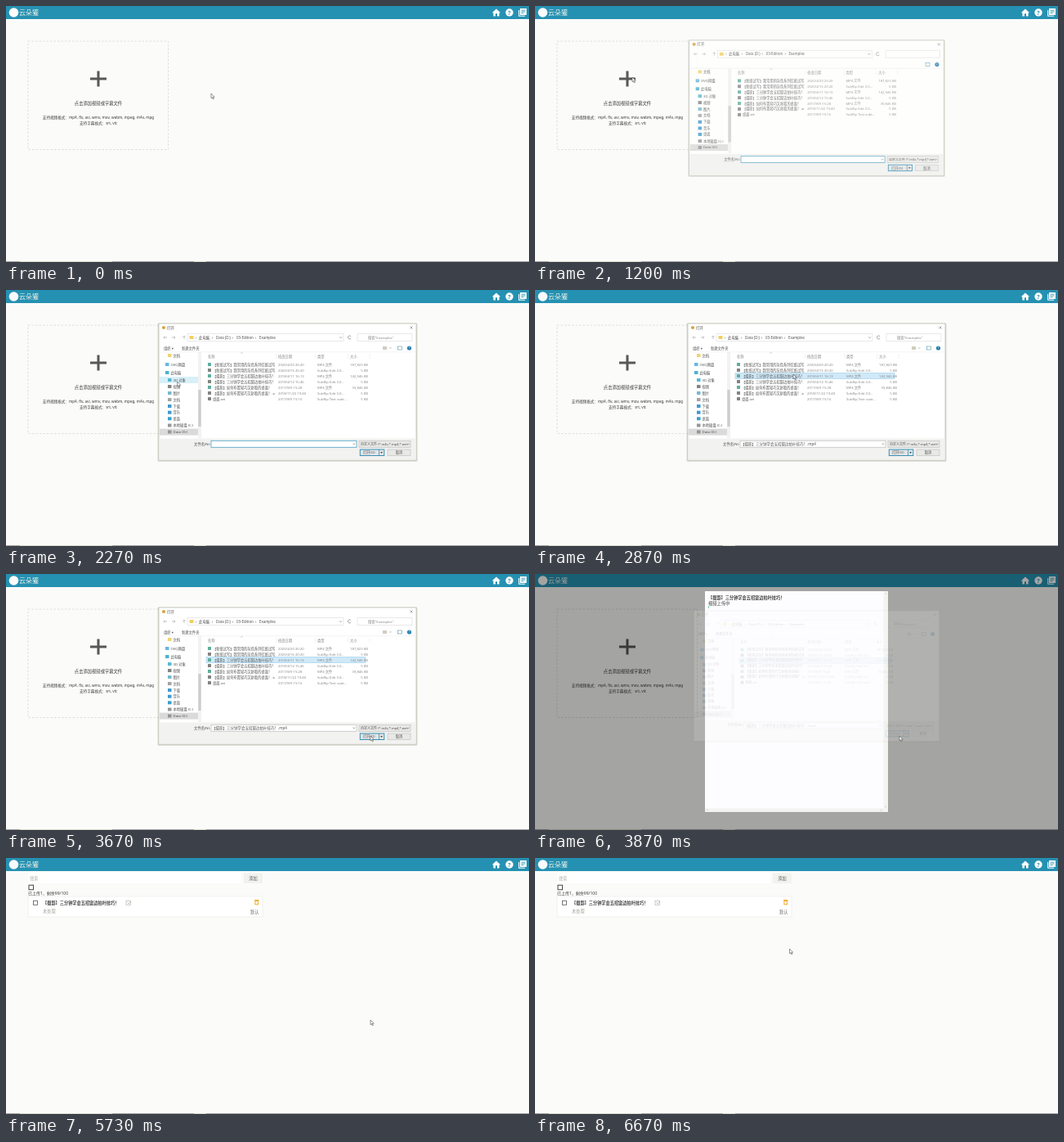
An HTML page for the animation above (6740 ms loop, 640x313 px).

```html
<!DOCTYPE html>
<html lang="zh">
<head>
<meta charset="utf-8">
<style>
html, body { margin: 0; width: 100%; height: 100%; overflow: hidden; background: #fbfbf9; }
svg { display: block; width: 640px; height: 313px; }
text { font-family: "Noto Sans", "Noto Sans CJK SC", sans-serif; white-space: pre; }
</style>
</head>
<body>
<svg id="stage" viewBox="0 0 640 313"></svg>
<script>
const LOOP = 6740;
const TITLE = '【摄影】三分钟学会五招窗边拍叶技巧！';
const PAGE = '#fbfbf9', BLUE = '#2591b2', INK = '#3c3c3c', TEXT = '#505050', FAINT = '#888', EDGE = '#c4c4c4';

// y is the vertical middle of the line
const text = (x, y, str, size = 4.6, fill = TEXT, more = '') =>
  `<text x="${x}" y="${y + size * .36}" font-size="${size}" fill="${fill}" ${more}>${str}</text>`;
const rect = (x, y, w, h, fill, more = '') =>
  `<rect x="${x}" y="${y}" width="${w}" height="${h}" fill="${fill}" ${more}/>`;
const box = (x, y, w, h, stroke, fill = 'none', width = .7) =>
  rect(x, y, w, h, fill, `stroke="${stroke}" stroke-width="${width}"`);
const line = (d, stroke, width = .8) =>
  `<path d="${d}" fill="none" stroke="${stroke}" stroke-width="${width}"/>`;
const dot = (x, y, r, fill) => `<circle cx="${x}" cy="${y}" r="${r}" fill="${fill}"/>`;
const group = (id, body) => `<g id="${id}">${body}</g>`;
const mid = 'text-anchor="middle"', end = 'text-anchor="end"', bold = 'font-weight="600"';

const header = rect(0, 0, 640, 16, BLUE) + dot(9.5, 8, 5.8, '#fbfbfb') +
  text(16, 8, '云朵獾', 8, '#f0f0e8') +
  '<path d="M600 3.5l5.2 4.7h-1.6v4.2h-2.6v-3.2h-2v3.2h-2.6v-4.2h-1.6z" fill="#fff"/>' +
  dot(616, 8, 4.7, '#fff') + text(616, 8, '?', 7, BLUE, mid + ' font-weight="700"') +
  line('M627.7 5v7.3h7.3', '#fff', 1.1) + rect(629, 3, 8, 8, '#fff') +
  line('M630.5 5.2h5M630.5 7h5M630.5 8.8h3', BLUE, .8);

const footer = rect(0, 312, 640, 1, '#a4a4a4') + rect(17, 312, 113, 1, '#dcdcd4') +
  rect(230, 312, 15, 1, '#dcdcd4');

const dropZone =
  rect(27, 43, 171.5, 132.5, 'none', 'stroke="#d8d8d0" stroke-width=".8" stroke-dasharray="2.5 2"') +
  line('M103 89h20M113 79.5v19', '#585858', 3) +
  text(113, 119, '点击添加视频或字幕文件', 5.3, INK, mid) +
  text(113, 136.5, '支持视频格式：mp4, flv, avi, wmv, mov, webm, mpeg, m4v, mpg', 4.6, INK, mid) +
  text(113, 143, '支持字幕格式：srt, vtt', 4.6, INK, mid);

const list =
  rect(27, 18, 261, 13, '#fff') + text(29, 25, '搜索', 5.2, '#b0b0a8') +
  rect(291, 18.5, 23, 12.5, '#f2f2ee') + text(302.5, 25, '添加', 5.2, '#606060', mid) +
  box(28, 33.2, 5.5, 5.5, '#484848', '#fff', 1) +
  text(27, 43.5, '已上传1，剩余99/100', 5, INK) +
  box(27, 47, 287, 25, '#ebebe8', '#fff') +
  box(33.5, 52.3, 5, 5, '#686868', 'none', .9) +
  text(45, 54.7, TITLE, 5.2, INK, bold) +
  box(147, 52.3, 5.5, 5, '#b4b4ac') + line('M148.5 54.5l1.5 1.5l3-3', '#b4b4ac') +
  text(45, 64.7, '未处理', 5.2, '#a0a098') + text(299, 66, '默认', 5.2, '#707070') +
  rect(304, 51, 5.4, 1, '#f2ab2c') + box(304.9, 52.6, 3.6, 4.2, '#f2ab2c', 'none', 1);

const places = [['文档', 80, '#f0d470'], ['OVQ网盘', 91, '#69b6e2'], ['此电脑', 101, '#4fb0d0'],
  ['3D 对象', 110, '#58b9d6'], ['视频', 118, '#848484'], ['图片', 126, '#77b9d0'],
  ['文档', 134, '#a4a4a4'], ['下载', 142, '#3f9ad0'], ['音乐', 149.7, '#3f9ad0'],
  ['桌面', 157.3, '#38a0cc'], ['本地磁盘 (C:)', 165.5, '#969696'], ['Data (D:)', 173.5, '#969696']];
const sidebar = rect(188, 169.6, 47, 8, '#dadada') +
  group('hover', rect(188, 106, 47, 8, '#d9f0f8')) +
  places.map(([name, y, color], i) => {
    const x = i && i < 3 ? 195 : 198;
    return rect(x, y - 2, 4.5, 4, color) + text(x + 6.5, y, name, 4.3);
  }).join('') +
  rect(235, 76, 4, 105, '#f2f2f2') + rect(235.3, 122, 3.4, 45, '#cdcdcd');

const ink = '【新纸试写】我常用的灰色系列信纸试写分…';
const files = [
  [ink, '2020/4/20 20:20', 'MP4 文件', '187,823 KB'],
  [ink, '2020/4/16 20:20', 'SubRip Edit 3.0…', '5 KB'],
  [TITLE, '2018/4/11 16:13', 'MP4 文件', '142,946 KB'],
  [TITLE, '2018/4/12 15:46', 'SubRip Edit 3.0…', '5 KB'],
  ['【摄影】如何布置轻巧又耐看的桌面！', '2017/8/9 15:28', 'MP4 文件', '39,846 KB'],
  ['【摄影】如何布置轻巧又耐看的桌面！.srt', '2018/11/22 19:40', 'SubRip Edit 3.0…', '5 KB'],
  ['桌面.srt', '2017/8/9 15:16', 'SubRip Text subt…', '5 KB']];
const fileRows = group('picked', box(245, 101.6, 195, 6.9, '#a4d2ec', '#d0e9f8')) +
  files.map(([name, date, type, size], i) => {
    const y = 91 + i * 7;
    return rect(247, y - 2, 4, 4, i % 2 || i === 6 ? '#848484' : '#5fae9e') +
      `<g clip-path="url(#nameColumn)">${text(253, y, name, 4.25)}</g>` +
      text(333, y, date, 4.2, FAINT) + text(381, y, type, 4.2, FAINT) +
      text(443, y, size, 4.2, FAINT, end);
  }).join('');

const dialog =
  rect(185.5, 40.5, 318, 169.5, '#707060', 'opacity=".22" rx="1.5"') +
  box(187, 41, 315, 167, '#b8b8a8', '#fff') +
  dot(193, 46, 2.1, '#d9a444') + text(197, 46, '打开', 4.4) +
  line('M494.5 44.5l3 3m0-3l-3 3', '#777', .6) +
  line('M197 58h-4l1.5-1.5m-1.5 1.5l1.5 1.5M203 58h4l-1.5-1.5m1.5 1.5l-1.5 1.5M218 60v-4l-1.5 1.5m1.5-1.5l1.5 1.5', '#a0a0a0', .6) +
  box(222, 53.5, 191, 9, '#e0e0e0') + rect(224.5, 56, 5, 4, '#f0d060') +
  [[232, '›'], [236, '此电脑'], [252, '›'], [257, 'Data (D:)'], [277, '›'], [282, '03-Edition'],
   [305, '›'], [310, 'Examples']].map(([x, s]) => text(x, 58, s, 4.4)).join('') +
  line('M408 57.3l1.5 1.5l1.5-1.5', '#707070', .6) +
  line('M422 56.7a2 2 0 1 0 .2 2.2', '#707070', .6) +
  box(430, 53.5, 67, 9, '#e0e0e0') +
  group('toolbar',
    text(443, 58, '搜索"Examples"', 4.3, FAINT) + text(193, 71, '组织 ▾', 4.3) +
    text(215, 71, '新建文件夹', 4.3) + rect(461, 69, 5, 4, '#cecec0') +
    line('M469 70.3l1.2 1.2l1.2-1.2', '#707070', .5)) +
  box(479.5, 69, 5, 4, '#6fa2b4') + dot(493.5, 71, 2.6, '#287fae') +
  text(493.5, 71, '?', 4, '#fff', mid) +
  line('M188 75.8h313', '#ebebeb', .6) + sidebar +
  text(247, 81, '名称', 4.3, FAINT) + text(333, 81, '修改日期', 4.3, FAINT) +
  text(381, 81, '类型', 4.3, FAINT) + text(421, 81, '大小', 4.3, FAINT) +
  line('M287 77.5l1.5-1.2l1.5 1.2', '#a0a0a0', .5) +
  line('M330.5 78v6M378.5 78v6M418.5 78v6M445 78v6', '#e5e5e5', .5) + fileRows +
  rect(187.5, 181.5, 314, 26, '#f2f2f0') + text(250, 188, '文件名(N):', 4.3, TEXT, end) +
  '<rect id="field" x="251" y="184.3" width="178" height="8" fill="#fff" stroke-width=".8"/>' +
  group('fileName', text(252, 188.3, TITLE + '.mp4', 4.5)) +
  line('M424.5 187.6l1.4 1.4l1.4-1.4', '#707070', .6) +
  box(432, 184.3, 63, 8, EDGE, '#e8e8e6') + text(434, 188.3, '自定义文件 (*.m4v;*.mp4;*.wm', 4) +
  line('M491 187.6l1.3 1.3l1.3-1.3', '#707070', .6) +
  box(433.3, 195, 29.5, 7.5, '#3a8fb4', '#e2e6e8', 1) + text(437, 198.8, '打开(O)', 4.3) +
  line('M456.5 195v7.5', '#3a8fb4') + `<path d="M458 198h3l-1.5 1.8z" fill="${INK}"/>` +
  box(467, 195, 28, 7.5, EDGE, '#e8e8e6') + text(481, 198.8, '取消', 4.3, TEXT, mid);

const upload = rect(0, 0, 640, 313, '#000', 'opacity=".35"') +
  rect(208, 21, 224, 270, '#fdfdff') + rect(426.5, 21, 5.5, 270, '#f3f3f0') +
  rect(208, 286.5, 224, 4.5, '#f3f3f0') +
  line('M428 24.5l1.2-1.2l1.2 1.2M428 284l1.2 1.2l1.2-1.2M211.5 287.6l-1.2 1.2l1.2 1.2M423 287.6l1.2 1.2l-1.2 1.2', '#b0b0a8', .5) +
  text(212, 29, TITLE, 5.2, INK, bold) + text(212, 36, '视频上传中', 5.3, INK) +
  '<rect id="bar" x="212" y="39" height="3" fill="#45b88c"/>';

const pointer = '<path id="cursor" d="M0 0v5.8l1.4-1.2l1 2.3l1-.4l-1-2.2h1.7z" fill="#fff" stroke="#505050" stroke-width=".6"/>';

document.getElementById('stage').innerHTML =
  '<clipPath id="nameColumn"><rect x="245" y="76" width="84" height="106"/></clipPath>' +
  rect(0, 0, 640, 313, PAGE) + header + footer + group('dropZone', dropZone) +
  group('list', list) + group('upload', upload) + group('dialog', dialog) + pointer;

const $ = id => document.getElementById(id);
const show = (id, on) => $(id).setAttribute('display', on ? 'inline' : 'none');
const ramp = (t, a, b) => Math.min(1, Math.max(0, (t - a) / (b - a)));
const ease = p => p * p * (3 - 2 * p);

// start, end, target x, target y
const START = [251, 107];
const moves = [[70, 730, 119, 87], [1470, 1780, 200, 113], [2200, 2600, 316, 103],
  [3000, 3500, 446, 198], [6200, 6670, 311.5, 111]];

function cursorAt(t) {
  let [x, y] = START;
  for (const [a, b, tx, ty] of moves) {
    const p = ease(ramp(t, a, b));
    x += (tx - x) * p;
    y += (ty - y) * p;
  }
  return [x, y];
}

function draw(t) {
  const opened = ramp(t, 1060, 1240), closed = ramp(t, 3735, 3895);
  const scale = 1 - .05 * (1 - opened) - .055 * closed;
  const picked = t >= 2660, done = t >= 5730;
  const [x, y] = cursorAt(t);

  show('dialog', opened > 0 && closed < 1);
  $('dialog').setAttribute('opacity', opened * (1 - closed));
  $('dialog').setAttribute('transform',
    `translate(345 124.5) scale(${scale}) translate(-345 -124.5)`);
  show('toolbar', t >= 1260);
  show('hover', x > 188 && x < 235 && y > 106 && y < 115);
  show('picked', picked);
  show('fileName', picked);
  $('field').setAttribute('stroke', picked ? EDGE : '#4a9fc0');

  show('upload', t >= 3790 && !done);
  $('bar').setAttribute('width', 214 * ramp(t, 3865, 5690));
  show('dropZone', !done);
  show('list', done);
  $('cursor').setAttribute('transform', `translate(${x} ${y})`);
}

function tick() {
  draw(performance.now() % LOOP);
  requestAnimationFrame(tick);
}
tick();
</script>
</body>
</html>
```
